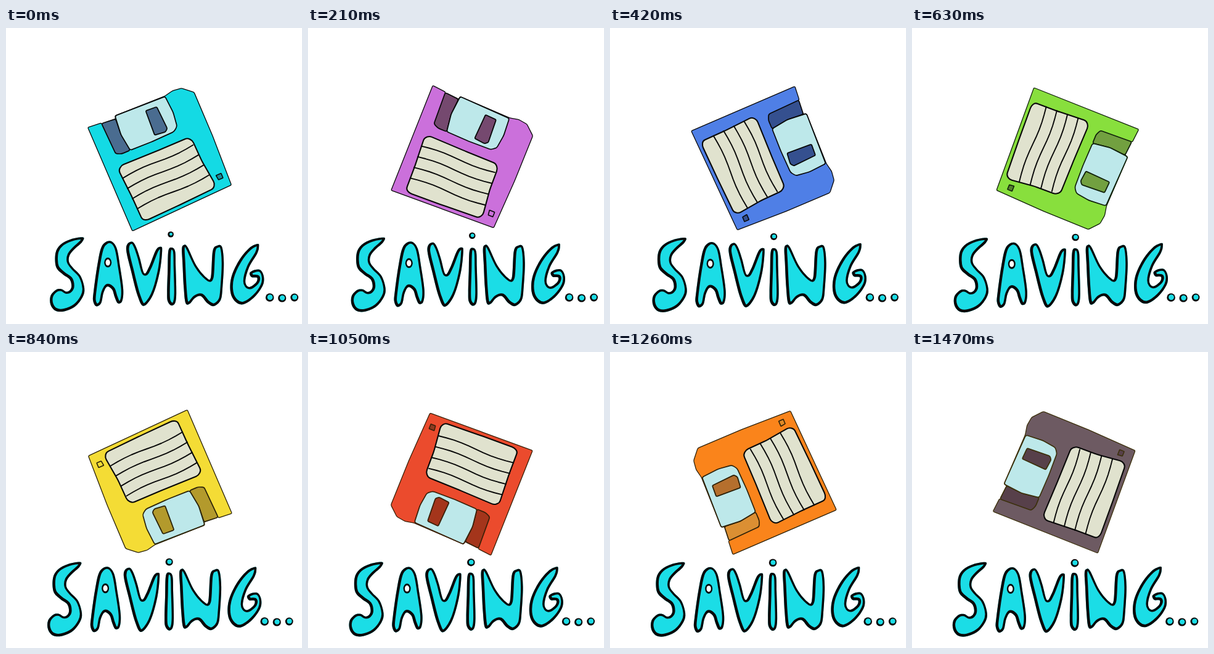
Recreate the animation shown at these times as an HTML page with a canvas. Size 480 px wide and 480 px high, loop 1680 ms.

```html
<!DOCTYPE html>
<html lang="en">
<head>
<meta charset="utf-8">
<title>Saving</title>
<style>
html, body { margin: 0; width: 100%; height: 100%; overflow: hidden; background: #fff; }
canvas { display: block; width: 480px; height: 480px; }
</style>
</head>
<body>
<canvas id="stage" width="480" height="480" role="img" aria-label="Saving..."></canvas>
<script>
const STEP = 210;
const CYAN = '#1bdde6', METAL = '#bde8ea', PAPER = '#e0e2ce', INK = '#080808';
const ctx = document.getElementById('stage').getContext('2d');
ctx.lineJoin = ctx.lineCap = 'round';

const points = text => text.split(' ').map(p => p.split(',').map(Number));

// One colour scheme per eighth of a turn.
const schemes = [
  { body: '#14dae4', grip: '#4a6c90', slot: '#4a6c90', hole: '#188c9c', line: INK },
  { body: '#cb70db', grip: '#75496f', slot: '#75496f', hole: '#cb70db', line: INK },
  { body: '#4f7fe6', grip: '#35508f', slot: '#35508f', hole: '#35508f', line: INK },
  { body: '#88df3d', grip: '#72a040', slot: '#72a040', hole: '#55802e', line: '#10200a' },
  { body: '#f4dc35', grip: '#b39a2c', slot: '#b39a2c', hole: '#f4dc35', line: '#2a2208' },
  { body: '#eb4b2d', grip: '#a4351b', slot: '#a4351b', hole: '#8d3a20', line: '#3a2008' },
  { body: '#fa841b', grip: '#db8f33', slot: '#b56f2d', hole: '#e08a28', line: '#2c2008' },
  { body: '#6d5a62', grip: '#57404a', slot: '#57404a', hole: '#57404a', line: '#3c300c' }
];

// Upright disk around its centre.
const disk = {
  body: points('-88,-92 -65,-90 -65,-87 -41,-87 -40,-92 47,-90 62,-93 77,-91 93,-77 93,0 90,85 0,88 -87,91'),
  grip: points('-65,-89 -41,-87 -43,-60 -39,-31 -54,-31 -63,-35'),
  metal: points('-40,-92 47,-89 49,-60 46,-37 38,-31 0,-30 -39,-31 -43,-60'),
  slot: points('9,-80 28,-79 30,-40 25,-36 7,-38'),
  label: points('-69,-8 -62,-14 0,-13 54,-13 60,-6 61,30 66,72 61,79 0,82 -58,84 -65,80 -66,40'),
  hole: points('73,61 82,61 82,69 74,69')
};

// Word outlines; lift is how much each letter sinks as the word drifts.
const letters = [
  { lift: 0.3, path: points('120,341 100,344 83,353 75,367 76,389 87,401 98,409 101,420 98,427 92,429 85,425 76,426 67,436 67,450 75,460 89,461 107,453 119,438 122,424 116,404 104,391 97,381 98,370 106,360 118,349') },
  { lift: 0.7, path: points('141,455 136,446 137,430 143,388 150,358 163,349 174,360 180,392 185,428 183,447 176,450 171,440 167,428 159,423 153,433 149,450') },
  { lift: 0.8, path: points('192,354 200,351 206,360 212,378 219,402 227,391 238,364 246,359 248,366 244,400 233,437 218,455 208,438 197,396 190,366') },
  { lift: 0.4, path: points('263,358 258,364 257,395 256,430 257,445 263,452 269,448 271,432 270,390 269,364') },
  { lift: 0, path: points('283,352 289,355 304,386 320,405 327,404 330,362 337,353 345,355 348,381 346,420 343,441 332,451 321,446 311,435 301,438 293,447 286,446 283,420 281,380 280,358') },
  { lift: -0.4, path: points('403,348 389,355 372,376 360,403 359,427 367,442 380,446 398,434 411,416 413,402 408,391 399,390 390,395 393,402 402,403 400,411 389,418 383,409 389,386 402,364 405,353') }
];

// Polygon with softened corners.
function polygon(list, r) {
  const path = new Path2D(), n = list.length;
  const toward = ([x, y], [u, v]) => {
    const d = Math.hypot(u - x, v - y), k = Math.min(r, d / 2) / d;
    return [x + (u - x) * k, y + (v - y) * k];
  };
  list.forEach((c, i) => {
    path.lineTo(...toward(c, list[(i + n - 1) % n]));
    path.quadraticCurveTo(...c, ...toward(c, list[(i + 1) % n]));
  });
  path.closePath();
  return path;
}

// Smooth closed curve through every point.
function blob(list) {
  const path = new Path2D(), n = list.length;
  const at = i => list[(i + n) % n];
  path.moveTo(...list[0]);
  list.forEach((b, i) => {
    const a = at(i - 1), c = at(i + 1), d = at(i + 2);
    path.bezierCurveTo(b[0] + (c[0] - a[0]) / 6, b[1] + (c[1] - a[1]) / 6,
                       c[0] - (d[0] - b[0]) / 6, c[1] - (d[1] - b[1]) / 6, ...c);
  });
  return path;
}

letters.forEach(l => { l.shape = blob(l.path); });

// Ruled line across the label: falls slightly and waves.
function ruledLine(row) {
  const path = new Path2D();
  for (let t = 0; t <= 1.001; t += 0.1) {
    const x = -68 + 3 * row / 4 + t * (126 + row);
    path.lineTo(x, 6 + 18.3 * row - 5 * t - 2 * Math.sin(2 * Math.PI * t));
  }
  return path;
}

function paint(path, fill, line, width) {
  if (fill) {
    ctx.fillStyle = fill;
    ctx.fill(path);
  }
  ctx.strokeStyle = line;
  ctx.lineWidth = width;
  ctx.stroke(path);
}

function drawDisk(i) {
  const { body, grip, slot, hole, line } = schemes[i];
  ctx.save();
  ctx.translate(249.5, 211.5);
  ctx.rotate((45 * i - 23) * Math.PI / 180);
  paint(polygon(disk.body, 2), body, line, 1.3);
  paint(polygon(disk.grip, 3), grip, line, 1.7);
  paint(polygon(disk.metal, 3), METAL, line, 1.7);
  paint(polygon(disk.slot, 2), slot, line, 1.8);
  paint(polygon(disk.label, 4), PAPER, INK, 2.1);
  for (let row = 0; row < 4; row++) paint(ruledLine(row), null, INK, 1.9);
  paint(polygon(disk.hole, 0.5), hole, line, 1.6);
  ctx.restore();
}

function oval(x, y, rx, ry, fill) {
  ctx.fillStyle = fill;
  ctx.beginPath();
  ctx.ellipse(x, y, rx, ry, 0, 0, Math.PI * 2);
  ctx.fill();
}

function dot(x, y, r) {
  oval(x, y, r, r, INK);
  oval(x + 0.4, y - 0.4, r - 2.4, r - 2.4, CYAN);
}

// Outline lies inside the shape, heavier at lower left.
function drawLetter({ shape, lift }, shift) {
  ctx.save();
  ctx.translate(shift, -lift * shift);
  ctx.fillStyle = CYAN;
  ctx.fill(shape);
  ctx.clip(shape);
  ctx.translate(0.5, -0.5);
  paint(shape, null, INK, 8);
  ctx.restore();
}

// The word settles leftwards over the loop, its dots a little faster.
function drawWord(i) {
  const shift = 6.5 * 0.78 ** i - 1.3;
  letters.forEach(l => drawLetter(l, shift));
  const x = 160 + shift, y = 384 - 0.7 * shift;
  oval(x, y, 6, 8, INK);
  oval(x, y, 3.6, 5, '#fff');
  dot(264 + 0.6 * shift, 342 - 1.4 * shift, 6.4 - 0.3 * shift);
  const trail = shift + 4.5 * 0.4 ** i;
  for (let k = 0; k < 3; k++) dot(418 + 20 * k + trail, 437 + k % 2, 6.8 - 0.2 * k);
}

let shown = -1;
function tick() {
  const i = Math.floor(performance.now() / STEP) % schemes.length;
  if (i !== shown) {
    shown = i;
    ctx.fillStyle = '#fff';
    ctx.fillRect(0, 0, 480, 480);
    drawDisk(i);
    drawWord(i);
  }
  requestAnimationFrame(tick);
}
tick();
</script>
</body>
</html>
```
